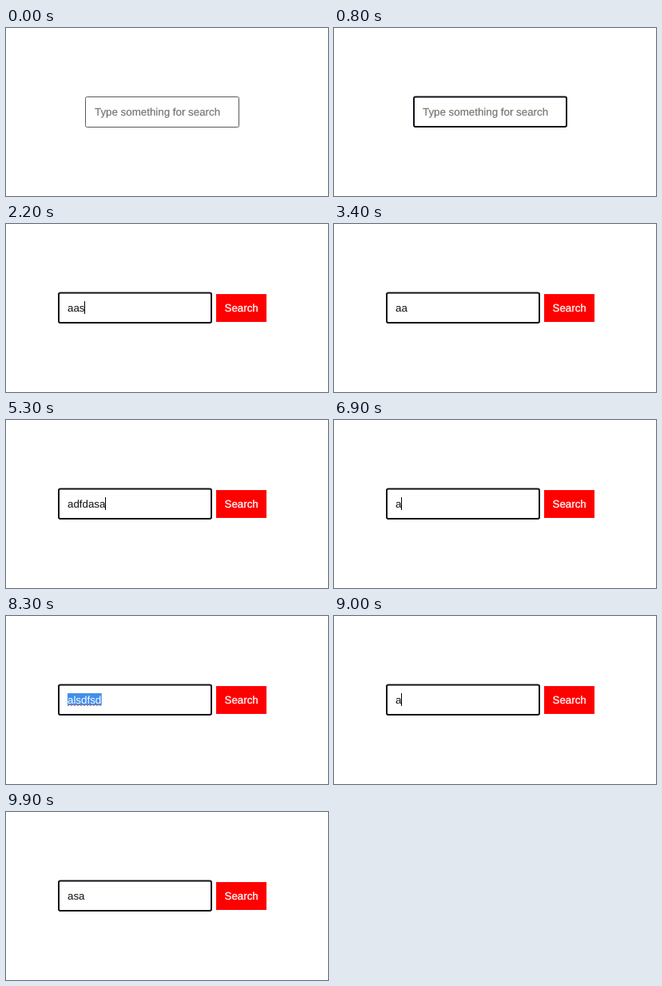
An HTML page with a canvas for the animation above (10 s loop, 403 px wide and 211 px high).

```html
<!DOCTYPE html>
<html lang="en">
<head>
<meta charset="utf-8">
<title>Search field</title>
<style>
  html, body { margin: 0; width: 100%; height: 100%; overflow: hidden; background: #fff; }
  canvas { display: block; width: 403px; height: 211px; }
</style>
</head>
<body>
<canvas id="stage" width="403" height="211"></canvas>
<script>
const ctx = document.getElementById('stage').getContext('2d');
const LOOP = 10000;
const BLINK = 500;
const FONT = '13.333px "Liberation Sans", Arial, sans-serif';
const MID_Y = 105.5;
const BASELINE = 110;

// Each entry: start time, field text, mode.
const steps = [
  [0, '', 'idle'],
  [300, '', 'idle'],
  [400, '', 'caret'],
  [800, '', 'hidden'],
  [1300, 'a', 'caret'],
  [1900, 'aa', 'caret'],
  [2200, 'aas', 'caret'],
  [2600, 'aa', 'caret'],
  [3600, 'a', 'caret'],
  [3700, 'ad', 'caret'],
  [3900, 'adf', 'caret'],
  [4200, 'adfd', 'caret'],
  [4400, 'adfda', 'caret'],
  [5000, 'adfdas', 'caret'],
  [5300, 'adfdasa', 'caret'],
  [5900, 'adfdasa', 'selected'],
  [6200, '', 'caret'],
  [6900, 'a', 'caret'],
  [7200, 'al', 'caret'],
  [7400, 'als', 'caret'],
  [7500, 'alsd', 'caret'],
  [7600, 'alsdf', 'caret'],
  [7700, 'alsdfs', 'caret'],
  [7800, 'alsdfsd', 'caret'],
  [8200, 'alsdfsd', 'selected'],
  [8600, '', 'caret'],
  [9000, 'a', 'caret'],
  [9200, 'as', 'caret'],
  [9400, 'asa', 'caret']
];

function drawText(text, x, color, weight = 0) {
  ctx.fillStyle = color;
  ctx.fillText(text, x, BASELINE);
  if (weight) {
    ctx.strokeStyle = color;
    ctx.lineWidth = weight;
    ctx.strokeText(text, x, BASELINE);
  }
}

function drawBorder(left, focused) {
  ctx.beginPath();
  if (focused) ctx.roundRect(left + 1, 86.5, 191, 37.5, 2);
  else ctx.roundRect(left + 0.5, 86.5, 192, 38, 2);
  ctx.lineWidth = focused ? 2 : 1;
  ctx.strokeStyle = focused ? '#101018' : '#5c565c';
  ctx.stroke();
}

function drawSquiggle(x, width) {
  ctx.beginPath();
  for (let i = 0; i <= width; i += 0.5) {
    ctx.lineTo(x + i, 112 + 0.8 * Math.sin(i * Math.PI / 2));
  }
  ctx.lineWidth = 1;
  ctx.strokeStyle = '#a8647c';
  ctx.stroke();
}

function drawButton() {
  ctx.fillStyle = '#ff0000';
  ctx.fillRect(263, MID_Y - 17.5, 63, 35);
  drawText('Search', 273.5, '#fff', 0.3);
}

function draw(time) {
  const [start, text, mode] = steps.findLast(step => step[0] <= time);
  const left = text ? 65 : 99;
  const textX = left + 12;

  ctx.fillStyle = '#fff';
  ctx.fillRect(0, 0, 403, 211);
  ctx.font = FONT;
  ctx.textRendering = 'geometricPrecision';
  const width = ctx.measureText(text).width;

  drawBorder(left, mode !== 'idle');
  if (text) drawButton();

  if (mode === 'selected') {
    ctx.fillStyle = '#428eea';
    ctx.fillRect(textX, 97, width + 0.5, 15);
    drawSquiggle(textX, width);
  }
  if (text) drawText(text, textX, mode === 'selected' ? '#fff' : '#111');
  else drawText('Type something for search', textX, '#757575', 0.2);

  const caretOn = Math.floor((time - start) / BLINK) % 2 === 0;
  if (mode === 'caret' && caretOn) {
    ctx.fillStyle = '#000';
    ctx.fillRect(Math.floor(textX + width), 97, 1, 16);
  }
}

const origin = performance.now();
function tick() {
  draw((performance.now() - origin) % LOOP);
  requestAnimationFrame(tick);
}
tick();
</script>
</body>
</html>
```
